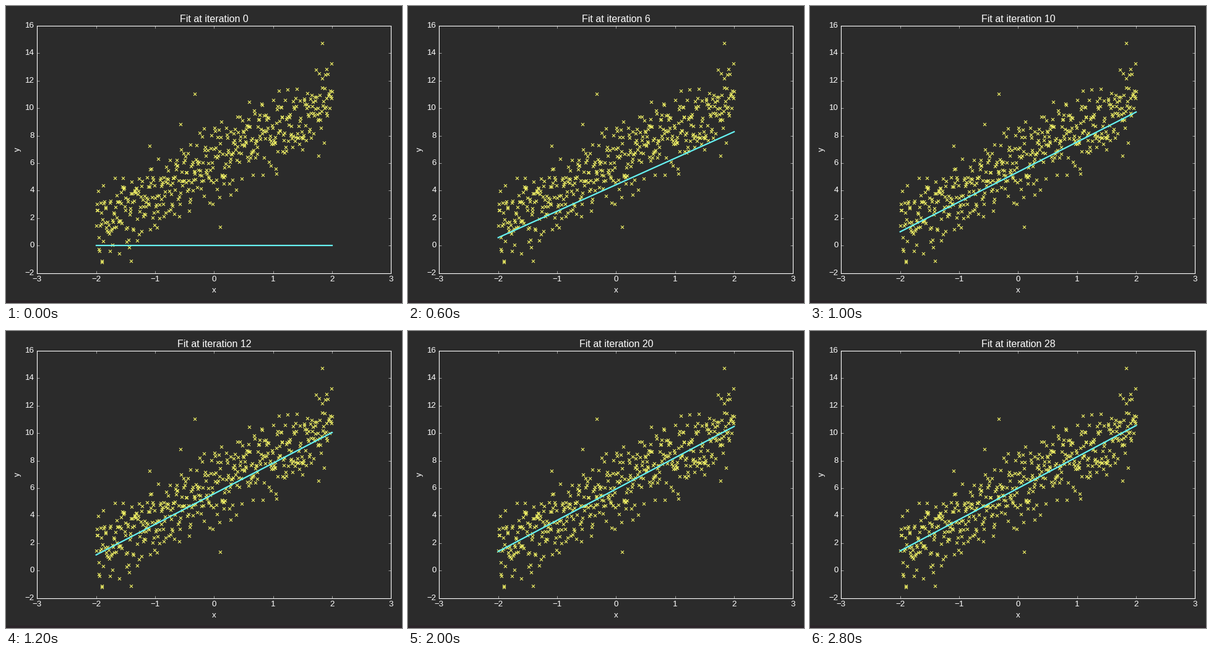
A matplotlib script for the animation above (3 s loop, 640 px wide and 480 px high).

```python
import matplotlib.pyplot as plt
import numpy as np
from matplotlib.animation import FuncAnimation
from matplotlib.patches import Rectangle

W, H, DPI = 640, 480, 80
FRAMES, INTERVAL = 15, 200
STEPS = 2                      # descent iterations per frame
RATE = 0.1
SLOPE, BIAS = 2.28, 6.01
SAMPLES, SIGMA = 500, 1.5
BG, YELLOW, CYAN = "#2b2b2b", "#f2f266", "#66f2f2"

# A few far samples that stand apart from the cloud.
OUTLIERS = [(1.83, 14.75), (-0.33, 11.05), (0.10, 1.37), (-1.41, -1.10),
            (-1.90, -1.13), (1.06, 5.22), (-1.10, 7.25), (0.59, 10.45),
            (0.28, 3.70), (-0.57, 8.82), (1.91, 12.85), (1.77, 6.55)]

plt.rcParams.update({
    "font.family": "Liberation Sans",
    "font.size": 12,
    "text.color": "white",
    "axes.edgecolor": "white",
    "axes.linewidth": 1.0,
    "xtick.color": "white",
    "ytick.color": "white",
    "ytick.alignment": "center",
})


def make_data():
    """Evenly spaced x, a linear trend and trimmed normal noise."""
    rng = np.random.default_rng(12)
    n = SAMPLES - len(OUTLIERS)
    noise = rng.normal(0, SIGMA, 2 * n)
    x = np.linspace(-2, 2, n)
    y = BIAS + SLOPE * x + noise[np.abs(noise) < 2 * SIGMA][:n]
    ox, oy = np.transpose(OUTLIERS)
    return np.append(x, ox), np.append(y, oy)


def fit(step):
    """Slope and bias after a number of gradient descent steps."""
    w = SLOPE * (1 - (1 - 2 * RATE * 4 / 3) ** step)
    b = BIAS * (1 - (1 - 2 * RATE) ** step)
    return w, b


fig = plt.figure(figsize=(W / DPI, H / DPI), dpi=DPI, facecolor=BG)
fig.add_artist(Rectangle((0, 0), 1, 4 / H, color="#2b2529", lw=0))

ax = fig.add_axes([50.4 / W, 48.22 / H, 572 / W, 400 / H], facecolor=BG)
ax.set(xlim=(-3, 3), ylim=(-2, 16),
       xticks=range(-3, 4), yticks=range(-2, 17, 2))
ax.tick_params(direction="in", length=4, width=0.5, pad=4,
               top=True, right=True)
fig.text(336.4 / W, 17 / H, "x", ha="center", va="baseline")
fig.text(19 / W, 248 / H, "y", rotation=90, ha="center", va="center")
title = fig.text(336.4 / W, 453.5 / H, "", size=14.4,
                 ha="center", va="baseline")

ax.scatter(*make_data(), s=20, marker="x", color=YELLOW, linewidths=1.0)
ends = np.array([-2, 2])
line, = ax.plot(ends, 0 * ends, color=CYAN, lw=2, zorder=3)


def draw(i):
    step = i * STEPS
    w, b = fit(step)
    line.set_ydata(w * ends + b)
    title.set_text(f"Fit at iteration {step}")
    return line, title


anim = FuncAnimation(fig, draw, frames=FRAMES, interval=INTERVAL,
                     repeat=True, repeat_delay=0)
plt.show()
```
